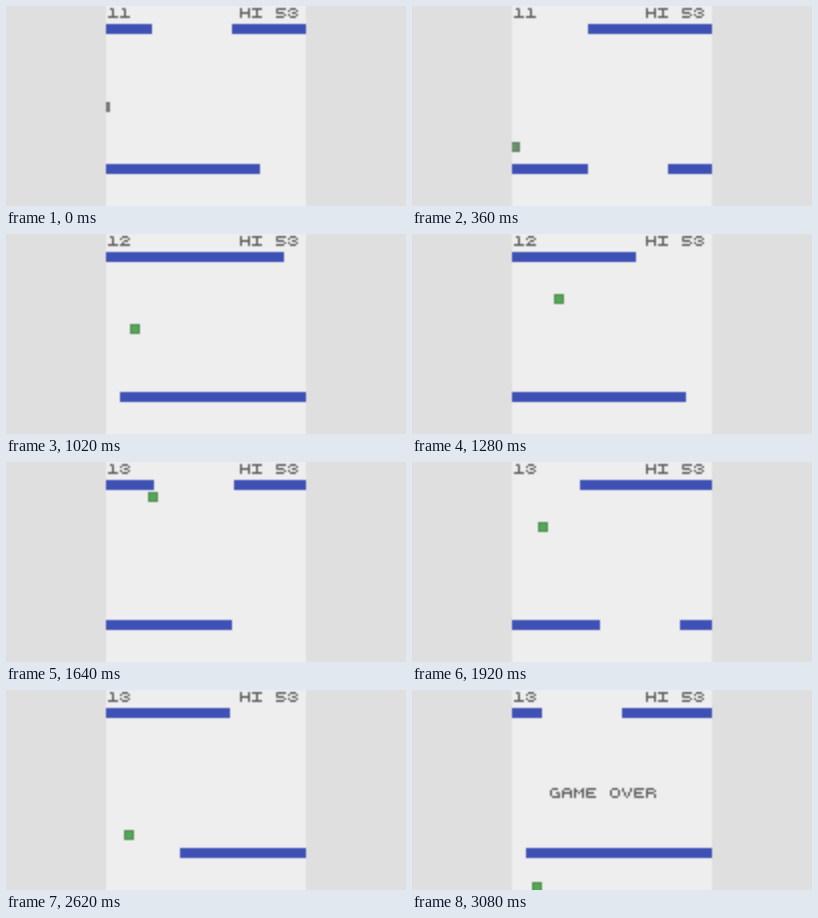
An HTML page with a canvas that plays this animation: 400x200 px, repeating every 3600 ms.

```html
<!DOCTYPE html>
<html lang="en">
<head>
<meta charset="utf-8">
<title>Bouncing block</title>
<style>
  html, body { margin: 0; width: 100%; height: 100%; overflow: hidden; background: #dfdfdf; }
  canvas { display: block; width: 400px; height: 200px; }
</style>
</head>
<body>
<canvas id="stage" width="200" height="100" role="img" aria-label="Score 13, HI 53, GAME OVER"></canvas>
<script>
// Drawn at half size; the browser's smooth scaling softens the edges.
const TICK = 20, LOOP = 3600, LAST = 154;
const SIZE = 100, GAP = 40, BLOCK = 5;
const ctx = document.getElementById('stage').getContext('2d');

// Letter strokes on a 5 by 5 grid
const GLYPHS = {
  1: 'M1 0h1v4M0 4h4',
  2: 'M1 0h2M0 1h0M4 1h0M2 2h1M1 3h0M0 4h4',
  3: 'M1 0h2M0 1h0M4 1h0M2 2h1M0 3h0M4 3h0M1 4h2',
  5: 'M4 0h-4v2h3M4 3h0M0 4h3',
  H: 'M0 0v4M4 0v4M0 2h4',
  I: 'M0 0h4M2 0v4M0 4h4',
  G: 'M1 0h2M0 1v2M1 4h3M3 2h1v2',
  A: 'M1 0h2M0 1v3M4 1v3M0 2h4',
  M: 'M0 0v4M4 0v4M1 1h0M3 1h0M2 2h0',
  E: 'M4 0h-4v4h4M0 2h3',
  O: 'M1 0h2M0 1v2M4 1v2M1 4h2',
  V: 'M0 0v1M4 0v1M1 2v1M3 2v1M2 4h0',
  R: 'M0 4v-4h3M4 1h0M0 2h3M4 3v1'
};
// Canvas skips strokes of zero length, so dots get a tiny one
const glyph = c => new Path2D((GLYPHS[c] || '').replaceAll('h0', 'h.01'));

function write(text, x, y) {
  ctx.strokeStyle = '#616161';
  ctx.lineCap = 'square';
  [...text].forEach((c, i) => {
    ctx.save();
    ctx.translate(x + i * 6 + 1.5, y + 1.5);
    ctx.stroke(glyph(c));
    ctx.restore();
  });
}

function box(color, x, y, w, h = w) {
  ctx.fillStyle = color;
  ctx.fillRect(x, y, w, h);
}

// The gap re-enters from the right with the next speed once it has left
function gapAt(n, left, [speed, ...next]) {
  const exit = (left + GAP) / speed;
  return n < exit || !next.length ? left - speed * n : gapAt(n - exit, SIZE, next);
}

function drawBar(y, left) {
  box('#3f51b5', 0, y, SIZE, BLOCK);
  box('#eee', Math.floor(left), y, GAP, BLOCK);
}

// One bounce on the floor, one on the ceiling, then a fall through the gap
function blockY(n) {
  const ceiling = 12.8, depth = 62.7, fallen = 35.45 + 1.125 * n;
  return ceiling + Math.min(fallen, Math.abs(2 * depth - fallen));
}

// Where the player steers: tick and x
const STEER = [[0, -2.9], [37, 2.5], [64, 21.5], [82, 21.5], [111, 4.5], [131, 9.5], [LAST, 10.5]];

function blockX(n) {
  const i = Math.max(1, STEER.findIndex(([t]) => t >= n));
  const [[t0, a], [t1, b]] = STEER.slice(i - 1, i + 1);
  const u = (n - t0) / (t1 - t0);
  return a + (b - a) * u * u * (3 - 2 * u);
}

function drawBlock(n) {
  const x = Math.floor(blockX(n)), y = Math.floor(blockY(n));
  const green = Math.min(39, n);
  box(`hsl(122, ${green * .6}%, 45%)`, x, y, BLOCK);
  box(`hsl(122, ${green}%, 49%)`, x + 1, y + 1, BLOCK - 2);
}

function draw(n) {
  ctx.clearRect(0, 0, 200, 100);
  box('#dfdfdf', 0, 0, 200, 100);
  ctx.save();
  ctx.translate(50, 0);
  ctx.beginPath();
  ctx.rect(0, 0, SIZE, SIZE);
  ctx.clip();
  box('#eee', 0, 0, SIZE);
  drawBar(9, gapAt(n, 23.4, [1.3785, 2.109, 2.025]));
  drawBar(79, gapAt(n, 77.4, [2.16, 1.3333]));
  drawBlock(n);
  write(n < 25 ? '11' : n < 80 ? '12' : '13', 0, 0);
  write('HI 53', 66, 0);
  if (n === LAST) write('GAME OVER', 18, 48);
  ctx.restore();
}

const begin = performance.now();
function frame() {
  const t = (performance.now() - begin) % LOOP;
  draw(Math.min(LAST, Math.floor(t / TICK)));
  requestAnimationFrame(frame);
}
frame();
</script>
</body>
</html>
```
